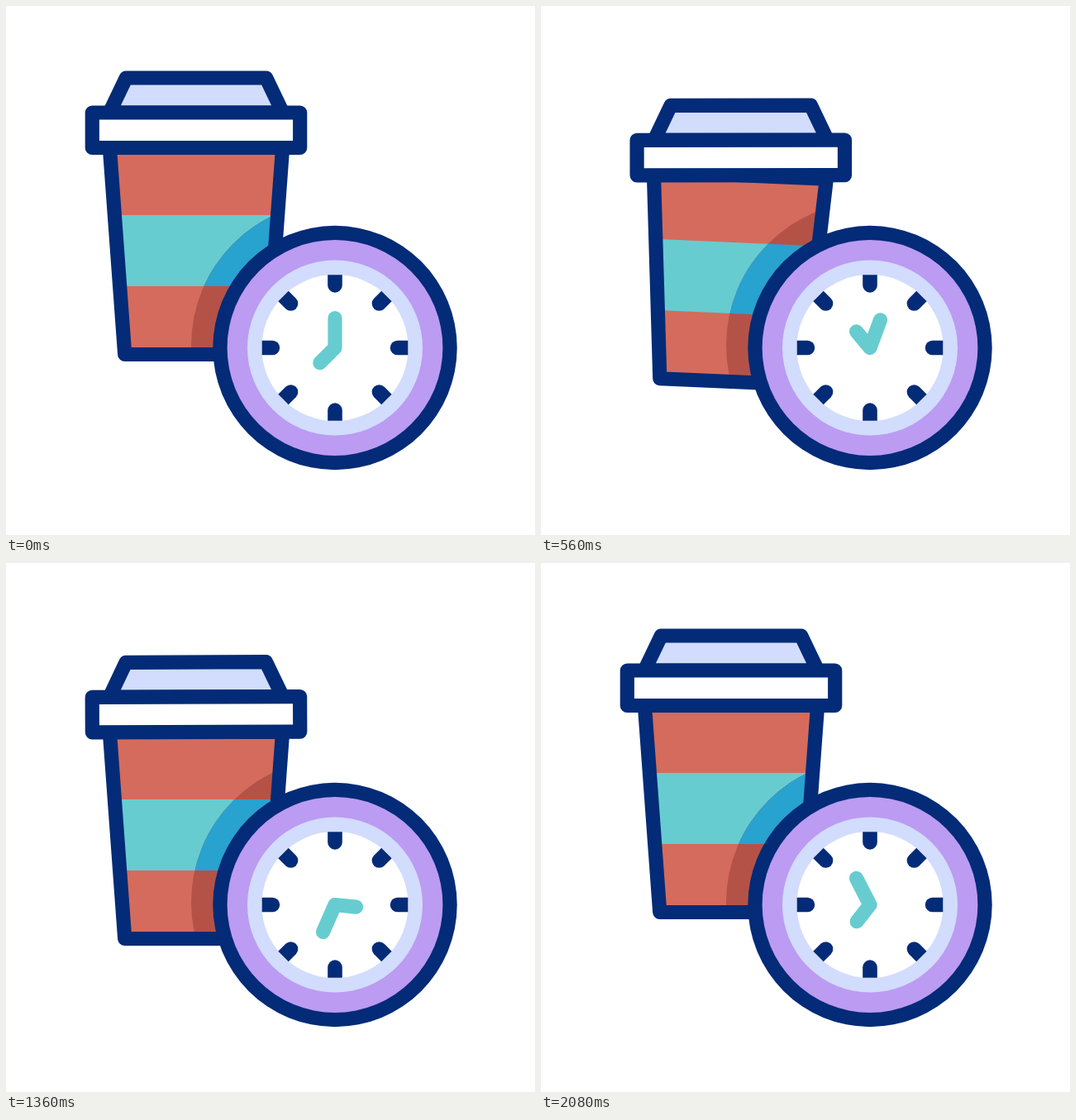
Recreate the animation shown at these times as an HTML page with a canvas. Size 640x640 px, loop 2.12 s.

```html
<!DOCTYPE html>
<html lang="en">
<head>
<meta charset="utf-8">
<title>Coffee time</title>
<style>
  html, body { margin: 0; width: 100%; height: 100%; overflow: hidden; background: #fff; }
  canvas { display: block; width: 640px; height: 640px; }
</style>
</head>
<body>
<canvas id="stage" width="640" height="640"></canvas>
<script>
const ctx = document.getElementById('stage').getContext('2d');
const LOOP = 2120, STEP = 40, TAU = Math.PI * 2;
const NAVY = '#032b77', PALE = '#d2dcfd', PURPLE = '#bc9bf2';
const TEAL = '#67ccd0', BLUE = '#28a2cf', RED = '#d56b5c', DARK_RED = '#b55247';
const LINE = 17.2;
const CUP_X = 230, CUP_BOTTOM = 421.5;
const CLOCK_X = 398, CLOCK_Y = 413.5;

const rad = deg => deg * Math.PI / 180;

// Smooth step from 0 to 1 between two times.
function ease(t, from, to) {
  const u = Math.min(1, Math.max(0, (t - from) / (to - from)));
  return (1 - Math.cos(Math.PI * u)) / 2;
}

// Sine swing that fades out; half is the time between zero crossings.
function swing(t, { from, to, half, size, fade = 1 }) {
  if (t <= from || t >= to) return 0;
  return size * ((to - t) / (to - from)) ** fade * Math.sin(Math.PI * (t - from) / half);
}

const cupY = t => -4 * ease(t, 0, 120) + 37 * ease(t, 120, 300) - 33 * ease(t, 1760, 2120);
const cupTurn = t => swing(t, { from: 145, to: 1360, half: 320, size: -4.7 });
const lidY = t => swing(t, { from: 0, to: 560, half: 270, size: -5.7, fade: 0.5 });
const lidTurn = t => swing(t, { from: 180, to: 2000, half: 310, size: 7.8, fade: 3 });
const clockTurn = t => swing(t, { from: 240, to: 1040, half: 320, size: -3.2 });

function turnAround(x, y, deg) {
  ctx.translate(x, y);
  ctx.rotate(rad(deg));
  ctx.translate(-x, -y);
}

// Symmetric shape around the cup's axis, from half widths at two heights.
function taper(top, topHalf, bottom, bottomHalf) {
  const path = new Path2D();
  path.moveTo(CUP_X - topHalf, top);
  path.lineTo(CUP_X + topHalf, top);
  path.lineTo(CUP_X + bottomHalf, bottom);
  path.lineTo(CUP_X - bottomHalf, bottom);
  path.closePath();
  return path;
}

const body = taper(171.5, 104.6, CUP_BOTTOM, 86.3);
const dome = taper(87, 84.7, 129, 104.8);
const brim = taper(129, 125.7, 171.5, 125.7);
const tick = new Path2D('M-8.8-88.3V-75.6a8.8 8.8 0 0 0 17.6 0V-88.3z');

function outlined(path, fill) {
  ctx.fillStyle = fill;
  ctx.fill(path);
  ctx.stroke(path);
}

function disc(r, fill) {
  ctx.beginPath();
  ctx.arc(0, 0, r, 0, TAU);
  ctx.fillStyle = fill;
  ctx.fill();
}

function bands(main, middle) {
  ctx.fillStyle = main;
  ctx.fillRect(100, 160, 260, 270);
  ctx.fillStyle = middle;
  ctx.fillRect(100, 253, 260, 86);
}

function drawCup(t) {
  ctx.save();
  ctx.lineWidth = LINE;
  ctx.lineJoin = 'round';
  ctx.strokeStyle = NAVY;
  ctx.translate(0, cupY(t));
  turnAround(CUP_X, CUP_BOTTOM, cupTurn(t));

  ctx.save();
  ctx.clip(body);
  bands(RED, TEAL);
  // The clock's shadow stays put while the cup moves under it.
  const pose = ctx.getTransform();
  ctx.resetTransform();
  ctx.beginPath();
  ctx.arc(CLOCK_X, CLOCK_Y - 3, 174, 0, TAU);
  ctx.clip();
  ctx.setTransform(pose);
  bands(DARK_RED, BLUE);
  ctx.restore();
  ctx.stroke(body);

  ctx.translate(0, lidY(t));
  turnAround(CUP_X, 150, lidTurn(t));
  outlined(dome, PALE);
  outlined(brim, '#fff');
  ctx.restore();
}

function drawHands(t) {
  const turn = t / LOOP * 360;
  const tip = (deg, len) => [len * Math.sin(rad(deg)), -len * Math.cos(rad(deg))];
  ctx.lineWidth = LINE;
  ctx.lineCap = ctx.lineJoin = 'round';
  ctx.strokeStyle = TEAL;
  ctx.beginPath();
  ctx.moveTo(...tip(turn * 4, 36));
  ctx.lineTo(0, 0);
  ctx.lineTo(...tip(225 + turn, 25.7));
  ctx.stroke();
}

function drawClock(t) {
  ctx.save();
  ctx.translate(CLOCK_X, CLOCK_Y);
  ctx.rotate(rad(clockTurn(t)));
  disc(147.7, NAVY);
  disc(130.4, PURPLE);
  disc(106, PALE);
  disc(88.6, '#fff');
  ctx.fillStyle = NAVY;
  for (let i = 0; i < 8; i++) {
    ctx.fill(tick);
    ctx.rotate(TAU / 8);
  }
  drawHands(t);
  ctx.restore();
}

const start = performance.now();

function render() {
  const elapsed = Math.max(0, performance.now() - start) % LOOP;
  const t = Math.floor(elapsed / STEP) * STEP;
  ctx.fillStyle = '#fff';
  ctx.fillRect(0, 0, 640, 640);
  drawCup(t);
  drawClock(t);
  requestAnimationFrame(render);
}
render();
</script>
</body>
</html>
```
